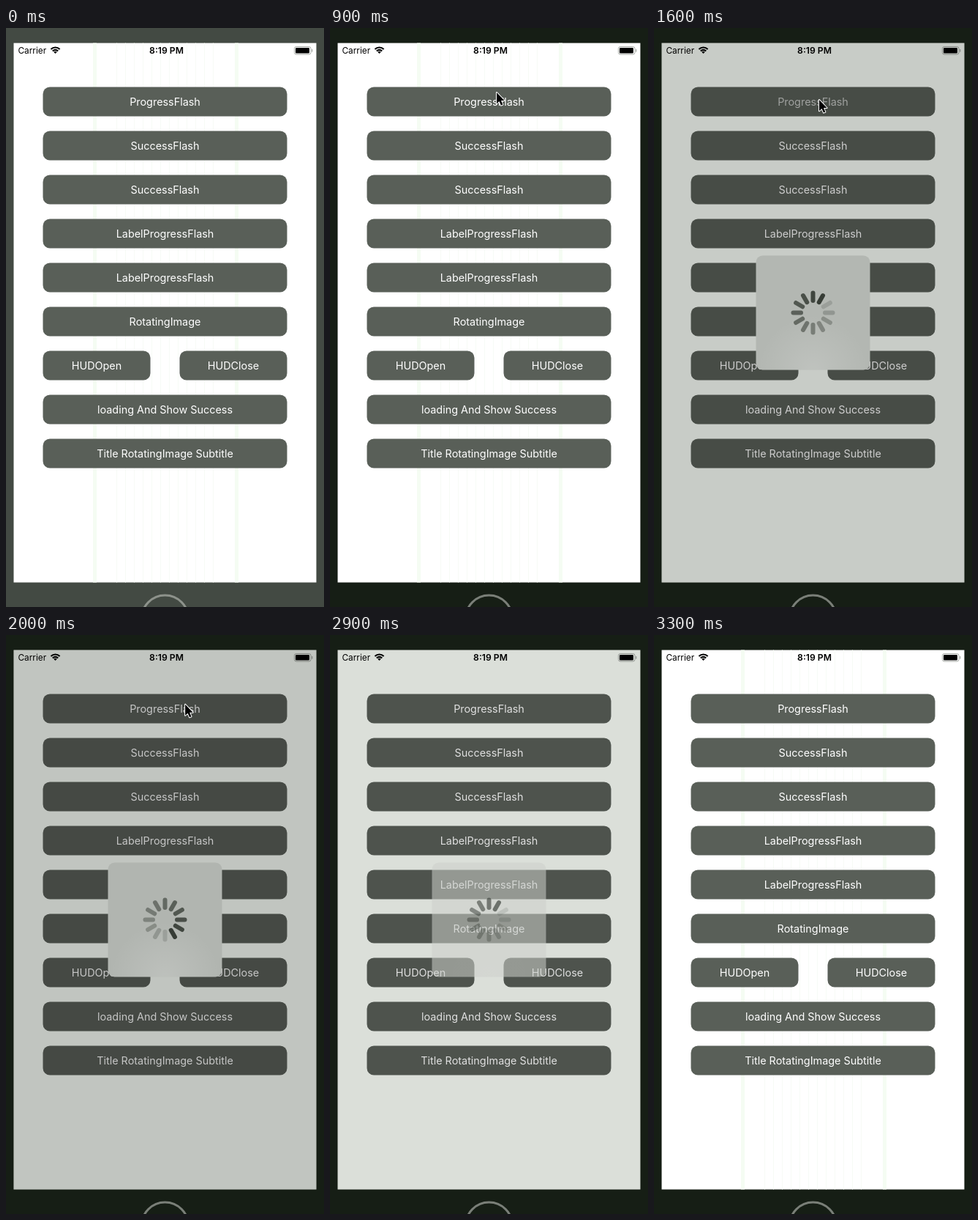
Recreate the animation shown at these times as an HTML page with a canvas. Size 435 by 790 pixels, loop 3400 ms.

```html
<!DOCTYPE html>
<html lang="en">
<head>
<meta charset="utf-8">
<title>Loading HUD</title>
<style>
  html, body { margin: 0; width: 100%; height: 100%; overflow: hidden; background: #161e15; }
  canvas { display: block; width: 435px; height: 790px; }
</style>
</head>
<body>
<canvas id="stage"></canvas>
<script>
const W = 435, H = 790, LOOP = 3400, STEP = 100;
const SCREEN = { w: 414, h: 736 };
const FONT = 'Inter, Roboto, "Liberation Sans", sans-serif';
const canvas = document.getElementById('stage');
const ctx = canvas.getContext('2d');
const ratio = window.devicePixelRatio || 1;
canvas.width = W * ratio;
canvas.height = H * ratio;

const rows = [
  ['ProgressFlash'],
  ['SuccessFlash'],
  ['SuccessFlash'],
  ['LabelProgressFlash'],
  ['LabelProgressFlash'],
  ['RotatingImage'],
  ['HUDOpen', 'HUDClose'],
  ['loading And Show Success'],
  ['Title RotatingImage Subtitle']
];

const ramp = (k, from, to) => Math.min(1, Math.max(0, (k - from) / (to - from)));
const easeOut = u => 1 - (1 - u) ** 3;
const smooth = u => u * u * (3 - 2 * u);
const lerp = (a, b, u) => a + (b - a) * u;
const mix = (a, b, u) => `rgb(${a.map((v, i) => Math.round(lerp(v, b[i], u)))})`;

// State of the scene at step k
function poseAt(k) {
  const shown = easeOut(ramp(k, 15, 17));
  const left = 1 - smooth(ramp(k, 27, 31.3));
  return {
    bezel: ramp(k, 0, 6),
    label: k < 12 ? 1 : lerp(.2, 1, easeOut(ramp(k, 15, 19))),
    dim: .228 * shown * left,
    panel: k < 15 ? 0 : left,
    tone: 193 - 16 * shown + 60 * (1 - left),
    head: Math.floor((k - 15) / 1.05 + .5),
    cursor: k >= 7 && k <= 22 && cursorAt(k)
  };
}

// Sweeps in, overshoots, settles on the first button, then speeds away
function cursorAt(k) {
  const enter = ramp(k, 7, 8), back = ramp(k, 8, 9), settle = ramp(k, 9, 16);
  const leave = ramp(k, 18, 22) ** 3;
  return {
    x: lerp(368, 236, enter) - 8 * back - 2 * settle + 153 * leave,
    y: lerp(567, 58, enter) + 30 * back + 10 * settle - 27 * leave
  };
}

function rect(x, y, w, h, color) {
  ctx.fillStyle = color;
  ctx.fillRect(x, y, w, h);
}

function roundRect(x, y, w, h, r, color) {
  ctx.beginPath();
  ctx.roundRect(x, y, w, h, r);
  ctx.fillStyle = color;
  ctx.fill();
}

function text(str, x, y, size, color, align = 'center', weight = 400) {
  ctx.font = `${weight} ${size}px ${FONT}`;
  ctx.textAlign = align;
  ctx.fillStyle = color;
  ctx.fillText(str, x, y);
}

function drawBezel(pose) {
  rect(0, 0, W, H, mix([67, 74, 67], [22, 30, 21], pose.bezel));
  ctx.strokeStyle = mix([141, 146, 139], [122, 127, 120], pose.bezel);
  ctx.lineWidth = 3;
  ctx.beginPath();
  ctx.arc(217.5, 806, 32, 0, Math.PI * 2);
  ctx.stroke();
}

function drawWifi(x, y) {
  const from = -Math.PI * .75, to = -Math.PI * .25;
  ctx.strokeStyle = ctx.fillStyle = '#000';
  ctx.lineWidth = 2.1;
  for (const r of [5.2, 8.6]) {
    ctx.beginPath();
    ctx.arc(x, y, r, from, to);
    ctx.stroke();
  }
  ctx.beginPath();
  ctx.moveTo(x, y);
  ctx.arc(x, y, 3.2, from, to);
  ctx.fill();
}

function drawStatusBar() {
  text('Carrier', 6, 14.5, 11.8, '#000', 'left');
  text('8:19 PM', 209, 14.5, 12.2, '#000', 'center', 600);
  drawWifi(57, 14.6);
  ctx.strokeStyle = '#a6aaa5';
  ctx.lineWidth = 1;
  ctx.beginPath();
  ctx.roundRect(384, 5, 22.5, 10.5, 2.6);
  ctx.stroke();
  roundRect(385.5, 6.5, 19, 7.5, 1.3, '#000');
  rect(407.7, 8.5, 1.2, 3.6, '#a6aaa5');
}

function drawButtons(pose) {
  const margin = 40, total = SCREEN.w - 2 * margin;
  rows.forEach((labels, row) => {
    const w = (total - margin * (labels.length - 1)) / labels.length;
    const y = 60 + row * 60;
    labels.forEach((label, col) => {
      const x = margin + col * (w + margin);
      roundRect(x, y, w, 40, 9.5, '#595f58');
      ctx.globalAlpha = row ? 1 : pose.label;
      text(label, x + w / 2, y + 25.5, 14.4, '#fff');
      ctx.globalAlpha = 1;
    });
  });
}

function drawScreen(pose) {
  const { w, h } = SCREEN;
  rect(0, 0, w, h, pose.dim ? '#fafff8' : '#fff');
  if (!pose.dim) {
    for (const x of [108.5, 302.5]) rect(x, 0, 5, h, '#f5fcf3');
    for (let i = 0; i < 12; i++) rect(140.5 + i * 12, 0, 1, h, '#f7fbf6');
  }
  drawStatusBar();
  drawButtons(pose);
  rect(0, 0, w, h, `rgba(0,0,0,${pose.dim})`);
}

function drawPanel(pose) {
  const { panel, tone, head } = pose;
  if (!panel) return;
  ctx.save();
  ctx.translate(SCREEN.w / 2, SCREEN.h / 2);
  ctx.globalAlpha = panel;
  roundRect(-78, -78, 156, 156, 9, `rgb(${tone},${tone + 4},${tone - 1})`);
  const glow = ctx.createRadialGradient(0, 78, 5, 0, 78, 75);
  glow.addColorStop(0, `rgba(255,255,255,${.15 * panel ** 3})`);
  glow.addColorStop(1, 'rgba(255,255,255,0)');
  ctx.fillStyle = glow;
  ctx.fill();
  for (let i = 0; i < 12; i++) {
    const age = ((head - i) % 12 + 12) % 12;
    ctx.globalAlpha = panel ** .7 * (1 - age * .073);
    roundRect(-3, -30, 6, 16.5, 3, '#373d36');
    ctx.rotate(Math.PI / 6);
  }
  ctx.restore();
}

function drawCursor({ cursor }) {
  if (!cursor) return;
  ctx.save();
  ctx.translate(cursor.x, cursor.y);
  const arrow = new Path2D('M0 0V15.2L3.5 12L6 17.6L8.4 16.6L6 11.1H10.6Z');
  ctx.lineJoin = 'round';
  ctx.lineWidth = 2;
  ctx.strokeStyle = '#fff';
  ctx.stroke(arrow);
  ctx.fillStyle = '#000';
  ctx.fill(arrow);
  ctx.restore();
}

const start = performance.now();

function draw() {
  const pose = poseAt(Math.floor((performance.now() - start) % LOOP / STEP));
  ctx.setTransform(ratio, 0, 0, ratio, 0, 0);
  drawBezel(pose);
  ctx.save();
  ctx.translate(10.5, 20.5);
  drawScreen(pose);
  drawPanel(pose);
  ctx.restore();
  drawCursor(pose);
  requestAnimationFrame(draw);
}
draw();
</script>
</body>
</html>
```
